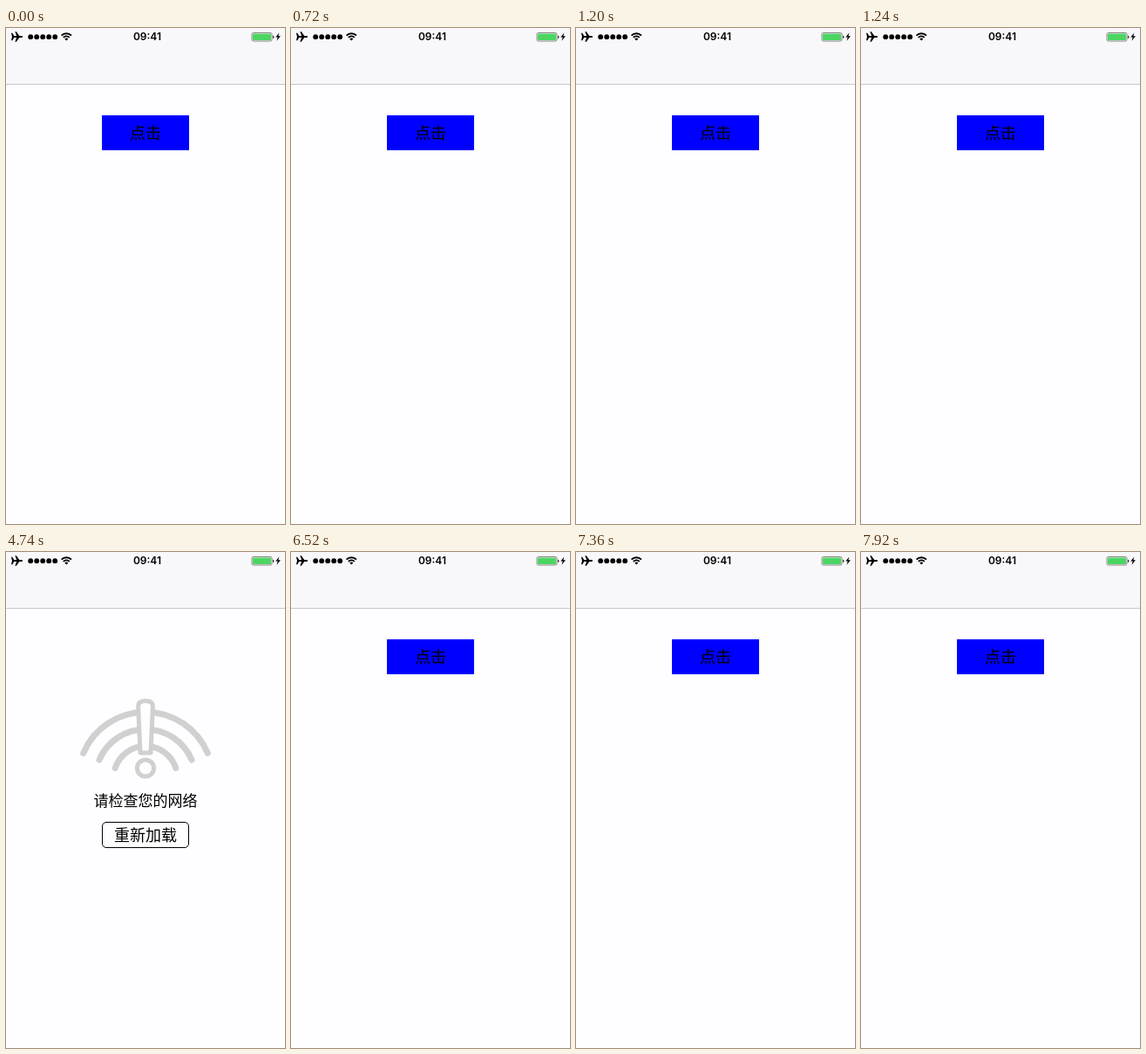
An HTML page that plays this animation: 320x568 px, repeating every 8 s.

```html
<!DOCTYPE html>
<html lang="zh-CN">
<head>
<meta charset="utf-8">
<title>重新加载</title>
<style>
  html, body { margin: 0; width: 100%; height: 100%; overflow: hidden; background: #fefdff; }
  svg { display: block; width: 100%; height: 100%; }
  text { text-anchor: middle; font-family: "Noto Sans CJK SC", "Noto Sans CJK", "Noto Sans CJK JP", sans-serif; }
  .clock { font: 600 12px Inter, Roboto, sans-serif; }
  .big { font-size: 18px; }
  .note { font-size: 17px; }
  .line { fill: none; stroke: #d0d0d0; stroke-linecap: round; stroke-linejoin: round; }
  #error { visibility: hidden; }
</style>
</head>
<body>
<svg viewBox="0 0 320 568">
  <rect width="320" height="568" fill="#fefdff"/>
  <rect width="320" height="64" fill="#f8f7fa"/>
  <rect y="64" width="320" height="1" fill="#c8c7ca"/>

  <g id="status">
    <path d="M6 5.8h1.3l1.9 3.2h3l-1.8-4.8h1.5l3.4 4.8h2.2q1.8 0 1.8 1t-1.8 1h-2.2l-3.4 4.8h-1.5l1.8-4.8h-3l-1.9 3.2H6l1-4.2z"/>
    <g id="dots"></g>
    <g fill="none" stroke="#000" stroke-width="1.9">
      <path d="M63.6 8.6a8 8 0 0 1 11.4 0"/>
      <path d="M65.8 10.9a5 5 0 0 1 7 0"/>
    </g>
    <path d="M69.3 14.6l-2-2.1a2.9 2.9 0 0 1 4 0z"/>
    <text class="clock" x="162" y="14.4">09:41</text>
    <rect x="282" y="5.5" width="23" height="9.5" rx="1.8" fill="#fff" stroke="#666" stroke-width=".8"/>
    <rect x="283" y="6.5" width="21" height="7.5" rx=".8" fill="#4cd562"/>
    <path d="M306 8.4q1.4.4 1.4 1.8t-1.4 1.8z" fill="#333"/>
    <path d="M313.4 5.4l-4.2 5.2h2.5l-1.2 4.2 4.4-5.5h-2.6z"/>
  </g>

  <g id="start">
    <rect x="110" y="100" width="100" height="40" fill="#00f"/>
    <text class="big" x="160" y="127">点击</text>
  </g>

  <g id="error">
    <g class="line" stroke-width="7">
      <path d="M88.7 230.3A77.5 77.5 0 0 1 231.3 230.3"/>
      <path d="M107 238A57.6 57.6 0 0 1 213 238"/>
      <path d="M125.2 247.5A36.6 36.6 0 0 1 194.8 247.5"/>
    </g>
    <g class="line" stroke-width="5" style="fill:#fefdff">
      <path d="M151.6 176.5Q151.6 170.5 160 170.5T168.4 176.5L166 230H154Z"/>
      <circle cx="160" cy="247.5" r="9.6"/>
    </g>
    <text class="note" x="160" y="290.5">请检查您的网络</text>
    <rect x="110.5" y="309.5" width="99" height="29" rx="4.5" fill="none" stroke="#000"/>
    <text class="big" x="160" y="331">重新加载</text>
  </g>
</svg>
<script>
  const LOOP = 8000, SHOW = 2080, HIDE = 6520;
  const el = id => document.getElementById(id);

  for (let i = 0; i < 5; i++) {
    const dot = document.createElementNS("http://www.w3.org/2000/svg", "circle");
    dot.setAttribute("cx", 28.2 + i * 7);
    dot.setAttribute("cy", 10.2);
    dot.setAttribute("r", 2.9);
    el("dots").append(dot);
  }

  function draw() {
    const t = performance.now() % LOOP;
    const offline = t >= SHOW && t < HIDE;
    el("start").style.visibility = offline ? "hidden" : "visible";
    el("error").style.visibility = offline ? "visible" : "hidden";
    requestAnimationFrame(draw);
  }
  draw();
</script>
</body>
</html>
```
